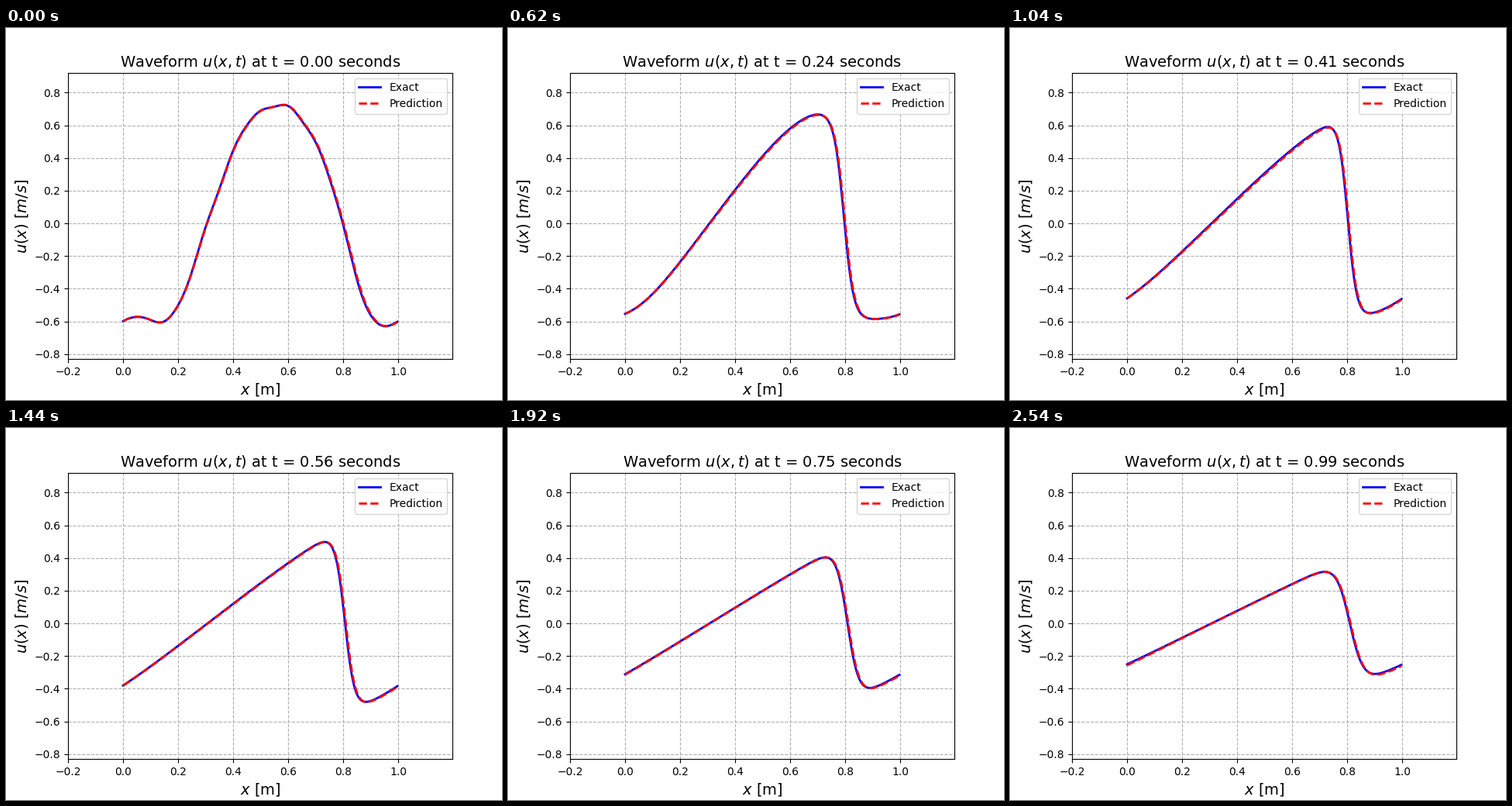
Write a matplotlib script that moves like this. It is 640 px wide and 480 px high and loops after 2.56 s.

```python
import numpy as np
import matplotlib.pyplot as plt
from matplotlib.animation import FuncAnimation

FRAMES = 128
N = 256
NU = 0.01
SUBSTEPS = 8

# Evenly spaced heights of the starting wave over one period
HEIGHTS = [-0.600, -0.570, -0.593, -0.597, -0.502, -0.293, -0.023,
           0.214, 0.445, 0.603, 0.688, 0.716, 0.716, 0.627,
           0.492, 0.275, -0.015, -0.345, -0.565, -0.627]

x = np.arange(N) / N
modes = np.arange(N // 2 + 1)
k = 2 * np.pi * modes


def initial_wave():
    """Band-limited periodic curve through the heights."""
    return np.fft.irfft(np.fft.rfft(HEIGHTS), N) * N / len(HEIGHTS)


def solve_burgers(u0):
    """Spectral integrating-factor RK4 for u_t + u u_x = NU u_xx."""
    keep = modes < N // 3
    dt = 1 / FRAMES / SUBSTEPS
    half = np.exp(-NU * k ** 2 * dt / 2)
    full = half ** 2

    def flux(v):
        return -0.5j * k * keep * np.fft.rfft(np.fft.irfft(v, N) ** 2)

    v = np.fft.rfft(u0)
    waves = [u0]
    for _ in range(FRAMES - 1):
        for _ in range(SUBSTEPS):
            a = flux(v)
            b = flux(half * (v + dt / 2 * a))
            c = flux(half * v + dt / 2 * b)
            d = flux(full * v + dt * half * c)
            v = full * v + dt / 6 * (full * a + 2 * half * (b + c) + d)
        waves.append(np.fft.irfft(v, N))
    return waves


def predict(u, t):
    """Slightly late copy of the wave, a touch low mid-way and at the ends."""
    late = np.interp(x * 0.9965, x, u, period=1)
    sag = 0.006 * np.sin(np.pi * x) * np.exp(-((t - 0.35) / 0.15) ** 2)
    ends = 0.006 * np.cos(np.pi * x) ** 6 * t ** 3
    return late - sag - ends


exact = solve_burgers(initial_wave())

fig, ax = plt.subplots(figsize=(6.4, 4.8), dpi=100)
exact_line, = ax.plot([], [], "b-", lw=2, label="Exact")
pred_line, = ax.plot([], [], "r--", lw=2, label="Prediction")
ax.set_xlim(-0.2, x[-1] + 0.2)
ax.set_ylim(-0.83, 0.922)
ax.set_xlabel("$x$ [m]", fontsize=14)
ax.set_ylabel("$u(x)$ [$m/s$]", fontsize=14)
ax.grid(True, linestyle="--")
ax.legend(loc="upper right")
title = ax.set_title("", fontsize=14)


def update(i):
    t = i / FRAMES
    exact_line.set_data(x, exact[i])
    pred_line.set_data(x, predict(exact[i], t))
    title.set_text(f"Waveform $u(x, t)$ at t = {t:.2f} seconds")
    return exact_line, pred_line, title


anim = FuncAnimation(fig, update, frames=FRAMES, interval=20, repeat=True)
plt.show()
```
